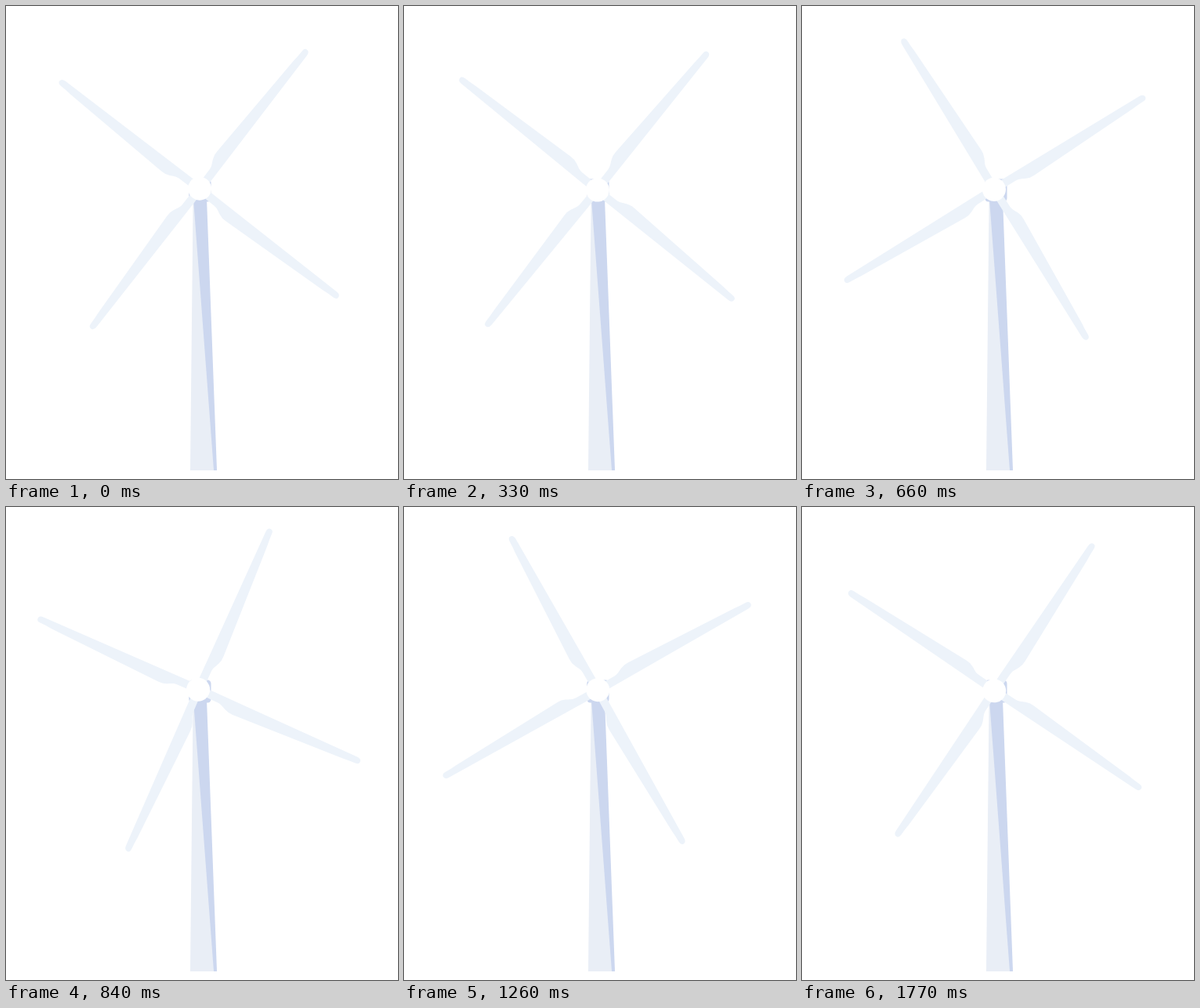
Animation of 500 by 603 pixels, one loop 1800 ms. Source, as an HTML page:

```html
<!DOCTYPE html>
<html lang="en">
<head>
<meta charset="utf-8">
<title>Wind turbine</title>
<style>
html, body { margin: 0; width: 100%; height: 100%; overflow: hidden; background: #fff; }
svg { display: block; width: 500px; height: 603px; }
</style>
</head>
<body>
<svg viewBox="0 0 500 603">
  <defs>
    <path id="blade" d="M0 5.5L17 5.8L219 4.4Q225 4.2 225 0Q225 -3.8 220 -3.9Q212 -4 203 -4.9L52 -11.2Q46 -11.6 41 -9.2C36 -7.2 34 -4.9 28 -4.7L0 -4.4Z"/>
  </defs>
  <path fill="#e9eef6" d="M238.6 247H245L265.5 592H235Z"/>
  <path fill="#ccd7ef" d="M239 246H256L269 592H265Z"/>
  <rect x="233.3" y="220.5" width="28.2" height="29" rx="4.5" fill="#ccd7ef"/>
  <g id="rotor" fill="#edf3fa">
    <use href="#blade"/>
    <use href="#blade" transform="rotate(-90)"/>
    <use href="#blade" transform="rotate(180) scale(1 -1)"/>
    <use href="#blade" transform="rotate(90) scale(1 -1)"/>
    <!-- the hub sits slightly off the axis -->
    <circle cx="1.2" cy=".3" r="15" fill="#fff"/>
  </g>
</svg>
<script>
const LOOP = 1800, STEP = 30;
// [time in ms, clockwise angle in degrees]; the speed is slightly uneven
const spin = [[0, -52.2], [330, 39], [660, 148.4], [1020, 259.6], [1260, 330.6], [1560, 423.5], [1770, 484]];
const rotor = document.getElementById('rotor');

function angleAt(t) {
  const i = Math.max(1, spin.findIndex(([time]) => time >= t));
  const [t0, a0] = spin[i - 1], [t1, a1] = spin[i];
  return a0 + (a1 - a0) * (t - t0) / (t1 - t0);
}

function draw(now) {
  const t = Math.floor(now % LOOP / STEP) * STEP;
  rotor.setAttribute('transform', `translate(246.1 233.5) rotate(${angleAt(t)})`);
  requestAnimationFrame(draw);
}
draw(performance.now());
</script>
</body>
</html>
```
